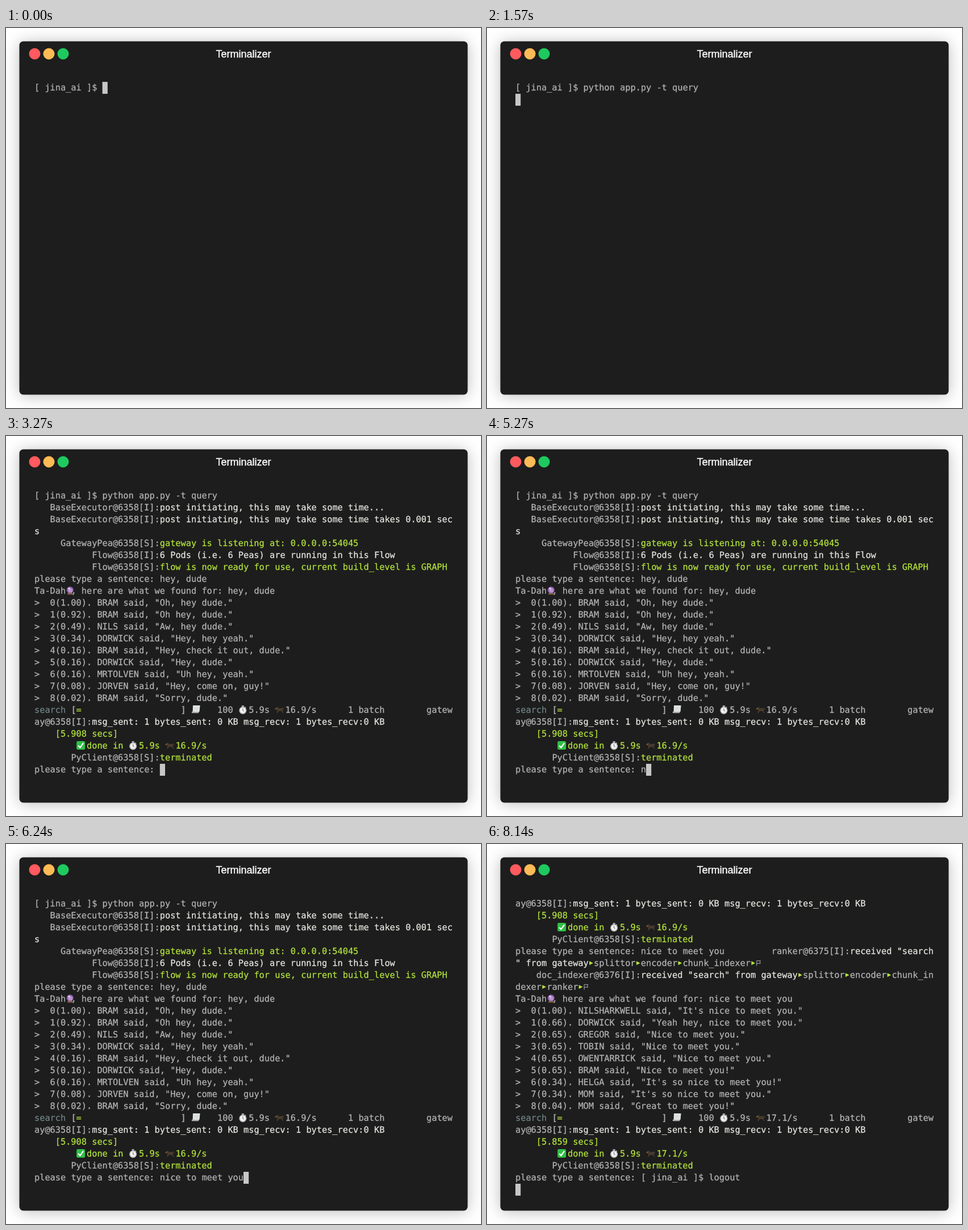
Write an HTML page that moves like this. It is 836x670 px and loops after 8240 ms.

```html
<!DOCTYPE html>
<html lang="en">
<head>
<meta charset="utf-8">
<title>Terminal session</title>
<style>
  html, body { margin: 0; width: 100%; height: 100%; overflow: hidden; background: #fff; }
  #shadow {
    position: absolute; left: 24px; top: 24px; width: 788px; height: 622px;
    border-radius: 7px; box-shadow: 0 2px 28px rgba(0, 0, 0, .28);
  }
  svg { position: absolute; left: 0; top: 0; display: block; }
  #screen { font: 15.281px "DejaVu Sans Mono", "Noto Sans Mono", monospace; text-rendering: geometricPrecision; }
  #screen text { stroke-width: .25px; }
  #title { font: 18px "Liberation Sans", Arial, sans-serif; fill: #fff; stroke: #fff; stroke-width: .35px; text-anchor: middle; }
</style>
</head>
<body>
<div id="shadow"></div>
<svg width="836" height="670" viewBox="0 0 836 670">
  <defs>
    <g id="page">
      <path d="M3 0H15.5L14.5 11H2.5Z" fill="#e3e4e5"/>
      <path d="M1 11H13.5Q14 13.5 12 13.5H2Q0 13 1 11Z" fill="#b4b6b8"/>
      <path d="M5 3H13M4.8 5.5H12.8M4.6 8H12.6" stroke="#cccecf" stroke-width=".8"/>
    </g>
    <g id="watch">
      <path d="M6 0H10V3H6ZM12 2L14 4L13 5L11 3Z" fill="#a5a7a8"/>
      <circle cx="8" cy="8.8" r="6.6" fill="#b4b6b7"/>
      <circle cx="8" cy="8.8" r="5" fill="#f3f3f0"/>
      <path d="M8 9V5.4M8 9L10 10" stroke="#55585a" fill="none"/>
    </g>
    <g id="horse">
      <path d="M1 5L4 3L6 5L12 5L15 4L16 8L14.5 7L13.5 9L15 13L14 14L11.5 10L7 10L5 13L3 14L4 10L4 7L1 8Z" fill="#4a3a2c"/>
      <path d="M3 3L5 2.5L8 5.5L6 6ZM13 5L15 4L16 9L14.5 7Z" fill="#2f382b"/>
      <path d="M0 7L2 4L4 4L3 7Z" fill="#7a5138"/>
    </g>
    <g id="check">
      <rect x=".5" y="0" width="15" height="15" rx="2.5" fill="#2fc046"/>
      <path d="M3.5 8L6.7 11.3L12.5 3.5" fill="none" stroke="#fff" stroke-width="2.2"/>
    </g>
    <g id="ball">
      <path d="M4 11H11L12.5 14.5H2.5Z" fill="#8a6440"/>
      <circle cx="7.5" cy="6.5" r="6" fill="#8d63ad"/>
      <circle cx="8" cy="7.2" r="3.8" fill="#b992cf"/>
      <circle cx="5.8" cy="4" r="1.8" fill="#e6d5f0"/>
    </g>
    <path id="arrow" d="M1.3 4.6L8 8L1.3 11.4Z" fill="#b3e33b"/>
    <path id="flag" d="M1.5 13V3.8H8.2L6.8 6.2L8.2 8.6H1.5" fill="none" stroke="#afafaf"/>
  </defs>
  <rect x="23.5" y="23.5" width="789" height="623" rx="7" fill="#1d1d1d"/>
  <circle cx="50.5" cy="45.5" r="10" fill="#ff5a5f"/>
  <circle cx="75.5" cy="45.5" r="10" fill="#ffbb55"/>
  <circle cx="100.5" cy="45.5" r="10" fill="#1fc95f"/>
  <text id="title" x="418" y="52">Terminalizer</text>
  <g id="screen"></g>
</svg>
<script>
const LOOP = 8240, LEFT = 50, TOP = 95, CELL = 9.2, ROW = 21, ROWS = 25;
// Each "|" starts a run whose first letter picks the colour.
const COLORS = { d: '#b4b4b4', w: '#e6e6e1', g: '#b3e33b', c: '#708387' };
const ICONS = { '📃': 'page', '⏱': 'watch', '🐎': 'horse', '✅': 'check', '🔮': 'ball', '▸': 'arrow', '⚐': 'flag' };

const PROMPT = '[ jina_ai ]$ ';
const ASK = 'dplease type a sentence: ';
const COMMAND = 'python app.py -t query';
const FIRST = 'hey, dude';
const SECOND = 'nice to meet you';

const found = (query, hits) => [
  `dTa-Dah🔮, here are what we found for: ${query}`,
  ...hits.map(([score, who, words], i) => `d>  ${i}(${score}). ${who} said, "${words}"`)
];

const stats = (secs, rate) => [
  `csearch|d [|g=|d${' '.repeat(19)}] 📃    100 ⏱ 5.9s 🐎 ${rate}/s      1 batch        gatew`,
  'day@6358[I]:|wmsg_sent: 1 bytes_sent: 0 KB msg_recv: 1 bytes_recv:0 KB',
  `g    [${secs} secs]`,
  `g        ✅ done in ⏱ 5.9s 🐎 ${rate}/s`,
  'd       PyClient@6358[S]:|gterminated'
];

const STARTUP = [
  'd   BaseExecutor@6358[I]:|wpost initiating, this may take some time...',
  'd   BaseExecutor@6358[I]:|wpost initiating, this may take some time takes 0.001 sec',
  'ws',
  'd     GatewayPea@6358[S]:|ggateway is listening at: 0.0.0.0:54045',
  'd           Flow@6358[I]:|w6 Pods (i.e. 6 Peas) are running in this Flow',
  'd           Flow@6358[S]:|gflow is now ready for use, current build_level is GRAPH'
];

const ANSWER_1 = [
  ...found(FIRST, [
    ['1.00', 'BRAM', 'Oh, hey dude.'],
    ['0.92', 'BRAM', 'Oh hey, dude.'],
    ['0.49', 'NILS', 'Aw, hey dude.'],
    ['0.34', 'DORWICK', 'Hey, hey yeah.'],
    ['0.16', 'BRAM', 'Hey, check it out, dude.'],
    ['0.16', 'DORWICK', 'Hey, dude.'],
    ['0.16', 'MRTOLVEN', 'Uh hey, yeah.'],
    ['0.08', 'JORVEN', 'Hey, come on, guy!'],
    ['0.02', 'BRAM', 'Sorry, dude.']
  ]),
  ...stats('5.908', '16.9')
];

const LOG_TAIL = '         ranker@6375[I]:|wreceived "search';
const ANSWER_2 = [
  'w" from gateway|d▸splittor▸encoder▸chunk_indexer▸⚐',
  'd    doc_indexer@6376[I]:|wreceived "search" from gateway|d▸splittor▸encoder▸chunk_in',
  'ddexer▸ranker▸⚐',
  ...found(SECOND, [
    ['1.00', 'NILSHARKWELL', "It's nice to meet you."],
    ['0.66', 'DORWICK', 'Yeah hey, nice to meet you.'],
    ['0.65', 'GREGOR', 'Nice to meet you.'],
    ['0.65', 'TOBIN', 'Nice to meet you.'],
    ['0.65', 'OWENTARRICK', 'Nice to meet you.'],
    ['0.65', 'BRAM', 'Nice to meet you!'],
    ['0.34', 'HELGA', "It's so nice to meet you!"],
    ['0.34', 'MOM', "It's so nice to meet you."],
    ['0.04', 'MOM', 'Great to meet you!']
  ]),
  ...stats('5.859', '17.1')
];

// Keys pressed by time t in bursts of [start, interval, count].
const keys = (t, bursts) => bursts.reduce((sum, [start, step, count]) =>
  sum + Math.max(0, Math.min(count, Math.floor((t - start) / step + 1e-6) + 1)), 0);

function linesAt(t) {
  const typed = (text, ...bursts) => text.slice(0, keys(t, bursts));
  const lines = ['d' + PROMPT + typed(COMMAND, [100, 60, 14], [990, 72.5, 8])];
  if (t >= 1670) lines.push(...STARTUP, ASK + typed(FIRST, [2770, 50, 9]));
  else if (t >= 1570) lines.push('d');
  if (t >= 3270) {
    const reply = typed(SECOND, [5270, 100, 1], [5370, 670 / 11, 12], [6110, 65, 3]);
    lines.push(...ANSWER_1, ASK + reply + (t >= 6300 ? LOG_TAIL : ''));
  } else if (t >= 3220) lines.push('d');
  if (t >= 6300) {
    const shell = t >= 6380 ? PROMPT : '';
    lines.push(...ANSWER_2, ASK + shell + (t >= 8140 ? 'logout' : ''));
  }
  if (t >= 8140) lines.push('d');
  return lines;
}

const screen = document.getElementById('screen');

function add(tag, attrs, text) {
  const el = document.createElementNS('http://www.w3.org/2000/svg', tag);
  for (const name in attrs) el.setAttribute(name, attrs[name]);
  if (text) el.textContent = text;
  screen.append(el);
}

// Draws one line on the character grid and returns its length in cells.
function drawLine(line, y) {
  let col = 0;
  for (const run of line.split('|')) {
    const fill = COLORS[run[0]];
    for (const part of run.slice(1).match(/ +|[📃⏱🐎✅🔮▸⚐]|[^ 📃⏱🐎✅🔮▸⚐]+/gu) || []) {
      const x = LEFT + col * CELL, icon = ICONS[part];
      if (icon) add('use', { href: '#' + icon, x, y: y + 2 });
      else if (part[0] !== ' ') add('text', { x, y: y + 15, fill, stroke: fill }, part);
      col += icon ? 1 : part.length;
    }
  }
  return col;
}

let shown = '';
function render(t) {
  const lines = linesAt(t).slice(-ROWS), key = lines.join('\n');
  if (key === shown) return;
  shown = key;
  screen.replaceChildren();
  let end = 0;
  lines.forEach((line, i) => { end = drawLine(line, TOP + i * ROW); });
  add('rect', {
    x: LEFT + end * CELL, y: TOP + (lines.length - 1) * ROW,
    width: CELL, height: ROW, fill: '#c7c7c7'
  });
}

function tick() {
  render(performance.now() % LOOP);
  requestAnimationFrame(tick);
}
tick();
</script>
</body>
</html>
```
